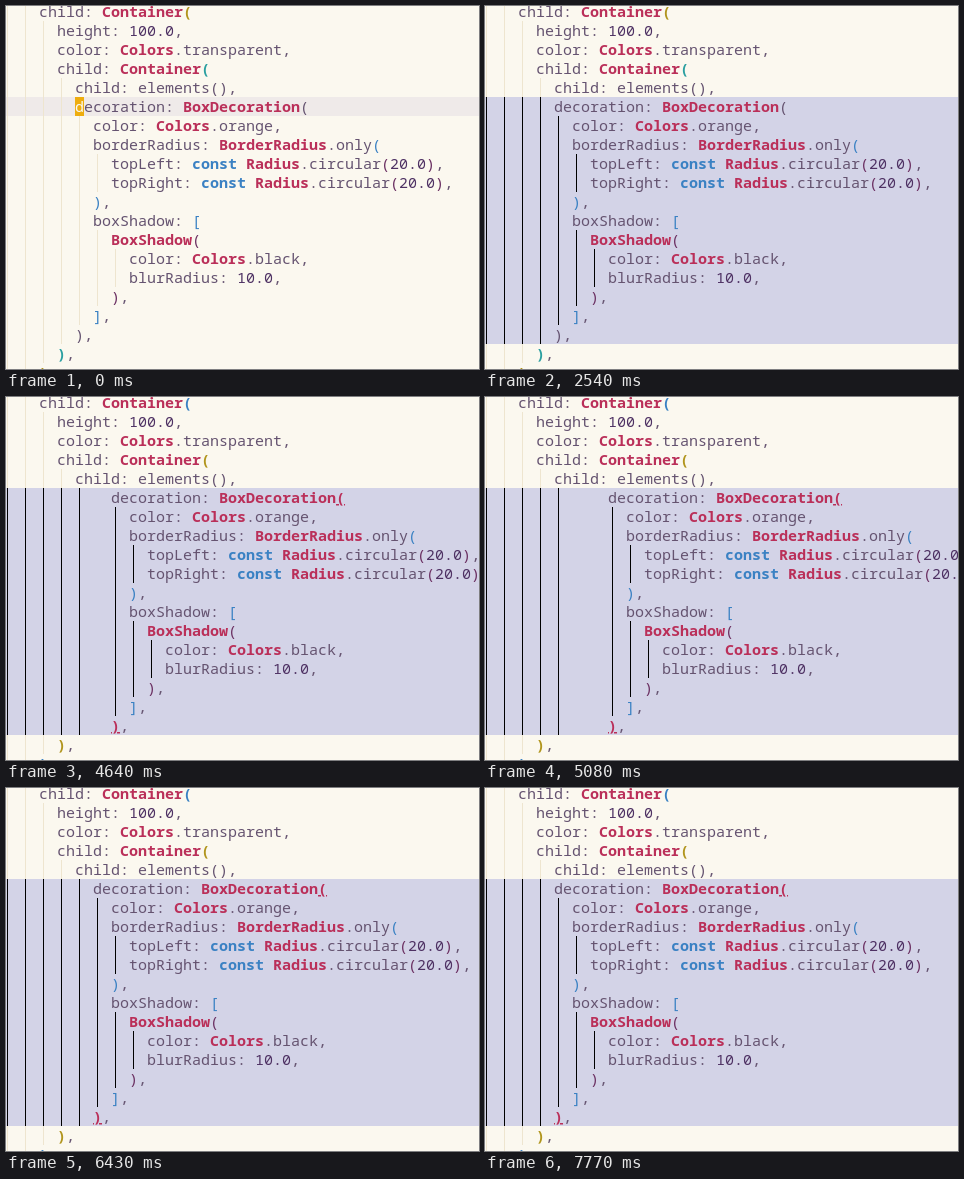
An HTML page that plays this animation: 473 by 363 pixels, repeating every 8.37 s.

```html
<!DOCTYPE html>
<html>
<head>
<meta charset="utf-8">
<style>
  html, body { margin: 0; width: 100%; height: 100%; overflow: hidden; background: #fbf8ef; }
  svg { display: block; }
  text { font: 15px "Noto Sans Mono", "DejaVu Sans Mono", monospace; white-space: pre; fill: #655370; }
  .b { font-weight: bold; }
  .match { text-decoration: underline; }
</style>
</head>
<body>
<svg id="stage" width="473" height="363" viewBox="0 0 473 363"></svg>
<script>
const LOOP = 8370, PITCH = 19, INDENT = 18, LEFT = -3, TOP = -4;
const FIRST = 5, LAST = 17; // rows of the indented block
const BLUE = '#3a81c3', PURPLE = '#6c3163', RED = '#ba2f59', GOLD = '#b1951d',
      TEAL = '#2a9fa0', BASE = '#655370', NUMBER = '#4e3163', PAPER = '#fbf8ef';

const code = `    child: Container(
      height: 100.0,
      color: Colors.transparent,
      child: Container(
        child: elements(),
        decoration: BoxDecoration(
          color: Colors.orange,
          borderRadius: BorderRadius.only(
            topLeft: const Radius.circular(20.0),
            topRight: const Radius.circular(20.0),
          ),
          boxShadow: [
            BoxShadow(
              color: Colors.black,
              blurRadius: 10.0,
            ),
          ],
        ),
      ),
    )`.split('\n');

// [start time, block shift in indent levels]
const shifts = [[0, 0], [4040, 1], [4640, 2], [5080, 3], [5830, 2], [6430, 1], [7030, 0]];

const rect = (x, y, w, h, fill) =>
  `<rect x="${x}" y="${y}" width="${w}" height="${h}" fill="${fill}"/>`;
const span = (s, fill, cls = '') => `<tspan fill="${fill}" class="${cls}">${s}</tspan>`;

function bracket(s, depth, row, matched) {
  if (depth === 2 && row >= FIRST && matched) return span(s, RED, 'b match');
  const outer = matched ? [BLUE, GOLD] : [GOLD, TEAL];
  return span(s, [...outer, BASE, BLUE, PURPLE][depth], depth < 2 ? 'b' : '');
}

function draw({ shift, selectedTo, matched, barHeight, pointer }) {
  const normal = selectedTo < 0;
  const blockTop = TOP + FIRST * PITCH;
  let out = normal
    ? rect(0, blockTop, 473, PITCH, '#efeae9')
    : rect(0, blockTop, 473, (selectedTo - FIRST + 1) * PITCH, '#d3d3e7');
  let depth = 0;

  code.forEach((line, row) => {
    const inBlock = row >= FIRST && row <= LAST;
    const move = inBlock ? shift : 0;
    const body = line.trim();
    const level = (line.length - body.length) / 2 + move;
    const x = LEFT + level * INDENT, y = TOP + row * PITCH;
    const selected = inBlock && row <= selectedTo;

    // guides skip the levels opened up by shifting the block
    for (let k = 0; k < level; k++) {
      if (k < 5 || k >= 4 + move)
        out += rect(1 + k * INDENT, y, 1, selected ? barHeight : PITCH, selected ? '#000' : '#eee5cf');
    }

    const marked = body.replace(/\bconst\b|\b[A-Z]\w*|\d+\.\d|[([]|[)\]]/g, s => {
      if (s === 'const') return span(s, BLUE, 'b');
      if (/[A-Z]/.test(s)) return span(s, RED, 'b');
      if (/\d/.test(s)) return span(s, NUMBER);
      return bracket(s, /[([]/.test(s) ? depth++ : --depth, row, matched);
    });
    const atCursor = normal && row === FIRST;
    if (atCursor) out += rect(x, y, 9, PITCH, '#eead0e');
    out += `<text x="${x}" y="${y + 15}">${atCursor ? span(marked[0], PAPER) + marked.slice(1) : marked}</text>`;
  });

  if (pointer)
    out += `<path transform="translate(${pointer})" d="M.5.5V15l3.5-3.3 2.6 6 2.4-1-2.6-5.8H11z" stroke="#fff"/>`;
  return out;
}

const stateAt = t => ({
  shift: shifts.filter(s => t >= s[0]).pop()[1],
  selectedTo: t < 1350 ? -1 : t < 2540 ? FIRST : LAST,
  matched: t >= 2690,
  barHeight: t < 1490 ? PITCH - 1 : PITCH,
  pointer: t < 7470 || t >= 7770 ? '' : t < 7620 ? '278 128' : '330.5 336'
});

const stage = document.getElementById('stage');
const start = performance.now();
let shown = '';

function tick() {
  const state = stateAt((performance.now() - start) % LOOP);
  const key = JSON.stringify(state);
  if (key !== shown) {
    stage.innerHTML = draw(state);
    shown = key;
  }
  requestAnimationFrame(tick);
}
tick();
</script>
</body>
</html>
```
